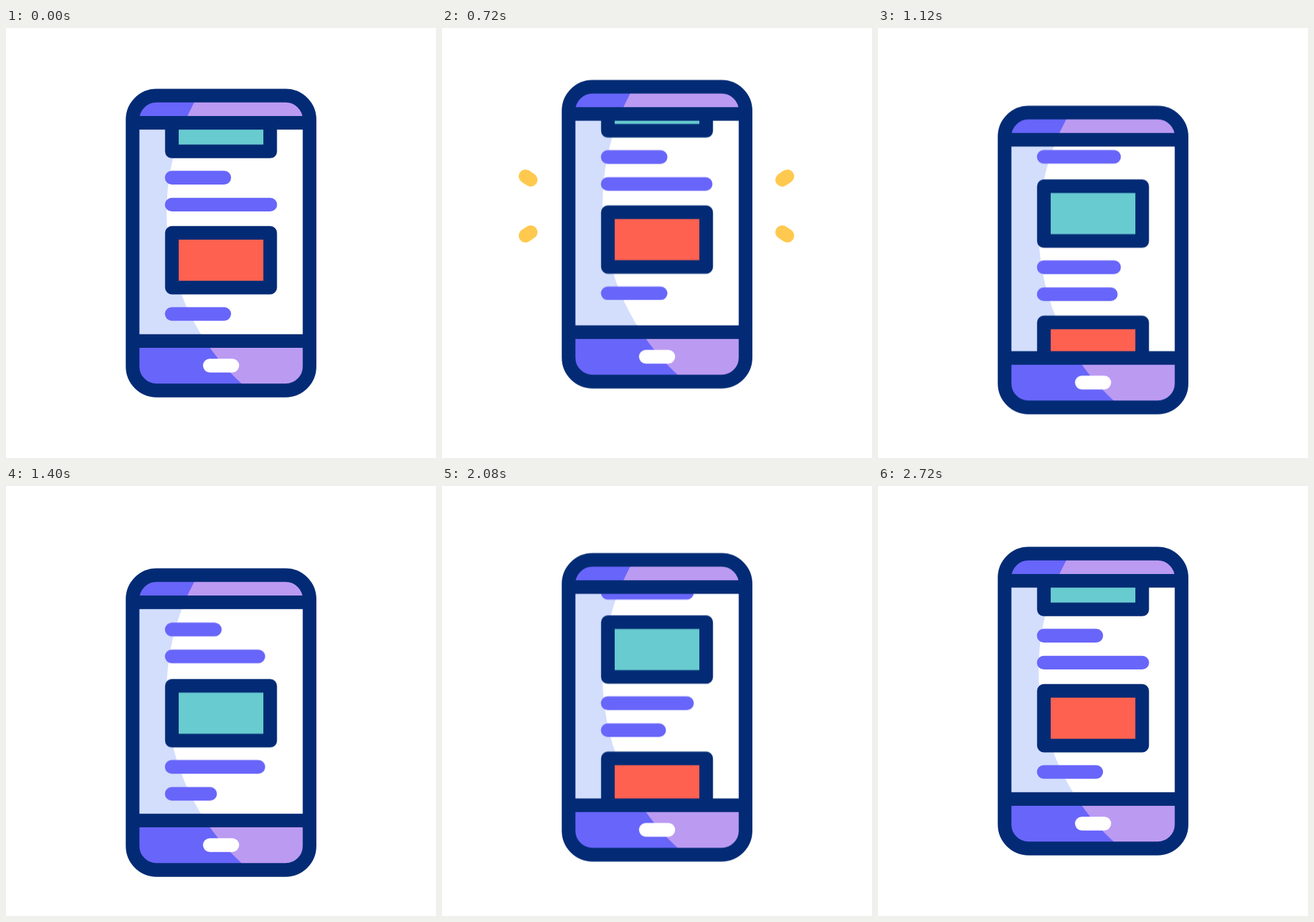
Write an HTML page that moves like this. It is 640 px wide and 640 px high and loops after 3 s.

```html
<!DOCTYPE html>
<html lang="en">
<head>
<meta charset="utf-8">
<title>Scrolling phone</title>
<style>
  :root {
    --navy: #032b75;
    --violet: #6865fa;
    --ease: cubic-bezier(.333, 0, .667, 1);
  }
  html, body { margin: 0; width: 100%; height: 100%; overflow: hidden; background: #fff; }
  svg { display: block; width: 100%; height: 100%; }

  .phone, .page, .bar, .spark { animation: 3s var(--ease) infinite; }
  .phone { animation-name: bob; }
  .page { animation-name: scroll; }
  .bar { x: 236.5px; height: 20.4px; rx: 10.2px; fill: var(--violet); }
  .short { width: 98.5px; --peak: 160px; animation-name: resize; }
  .long { width: 167px; --peak: 58.5px; animation-name: resize; }
  .first { --peak: 67px; }
  .line { fill: none; stroke: var(--navy); stroke-width: 20.3; stroke-linejoin: round; }
  .spark {
    stroke: #ffc94f; stroke-width: 20.3; stroke-linecap: round;
    stroke-dasharray: 30 60; stroke-dashoffset: 31; animation-name: burst;
  }

  @keyframes bob {
    0%, 6.67% { transform: translateY(0); }
    20% { transform: translateY(-17px); animation-timing-function: cubic-bezier(.333, 0, .35, 1); }
    47.33% { transform: translateY(32px); }
    54.83% { transform: translateY(32px); animation-timing-function: cubic-bezier(.333, 0, .25, 1); }
    86.5%, 100% { transform: translateY(0); }
  }
  @keyframes scroll {
    0%, 6.67% { transform: translateY(0); }
    22.23% { transform: translateY(-20px); animation-timing-function: cubic-bezier(.333, 0, .5, 1); }
    49.5%, 55.17% { transform: translateY(166px); }
    85.57%, 100% { transform: translateY(0); }
  }
  @keyframes resize {
    22.23% { }
    0%, 22.23%, 90%, 100% { width: var(--rest); }
    55.57% { width: var(--peak); }
  }
  .short { --rest: 98.5px; }
  .long { --rest: 167px; }
  @keyframes burst {
    0%, 11.33% { stroke-dashoffset: 31; }
    18.67% { stroke-dashoffset: 0; }
    27.4%, 100% { stroke-dashoffset: -31; }
  }
</style>
</head>
<body>
<svg viewBox="0 0 640 640">
  <defs>
    <clipPath id="body"><rect x="188.5" y="100.5" width="263.5" height="439" rx="35.7"/></clipPath>
    <clipPath id="screen"><rect x="190" y="145" width="260" height="317"/></clipPath>
  </defs>

  <path class="spark" d="M149.2 237.4L124.3 220.8"/>
  <path class="spark" d="M149.2 292.4L124.3 309"/>
  <path class="spark" d="M489.1 237.4L514 220.8"/>
  <path class="spark" d="M489.1 292.4L514 309"/>

  <g class="phone">
    <g clip-path="url(#body)">
      <rect x="180" y="95" width="280" height="450" fill="#6865fa"/>
      <circle cx="586" cy="274.5" r="347" fill="#bb9af2"/>
    </g>
    <g clip-path="url(#screen)">
      <rect x="190" y="145" width="260" height="317" fill="#d3defd"/>
      <circle cx="586" cy="274.5" r="347" fill="#fff"/>
      <g class="page">
        <rect class="bar long first" y="8.2"/>
        <rect class="bar short" y="48.2"/>
        <rect class="line" x="246.9" y="102.2" width="146.3" height="81.5" style="fill:#68cbd0"/>
        <rect class="bar short" y="212.6"/>
        <rect class="bar long" y="252.7"/>
        <rect class="line" x="246.9" y="304.9" width="146.3" height="81.5" style="fill:#ff6151"/>
        <rect class="bar short" y="415.4"/>
      </g>
    </g>
    <rect x="293.2" y="492.3" width="53.8" height="20.4" rx="10.2" fill="#fff"/>
    <rect class="line" x="188.4" y="100.6" width="263.4" height="438.9" rx="35.7"/>
    <path class="line" d="M188.4 141.2H451.8M188.4 465.9H451.8"/>
  </g>
</svg>
</body>
</html>
```
